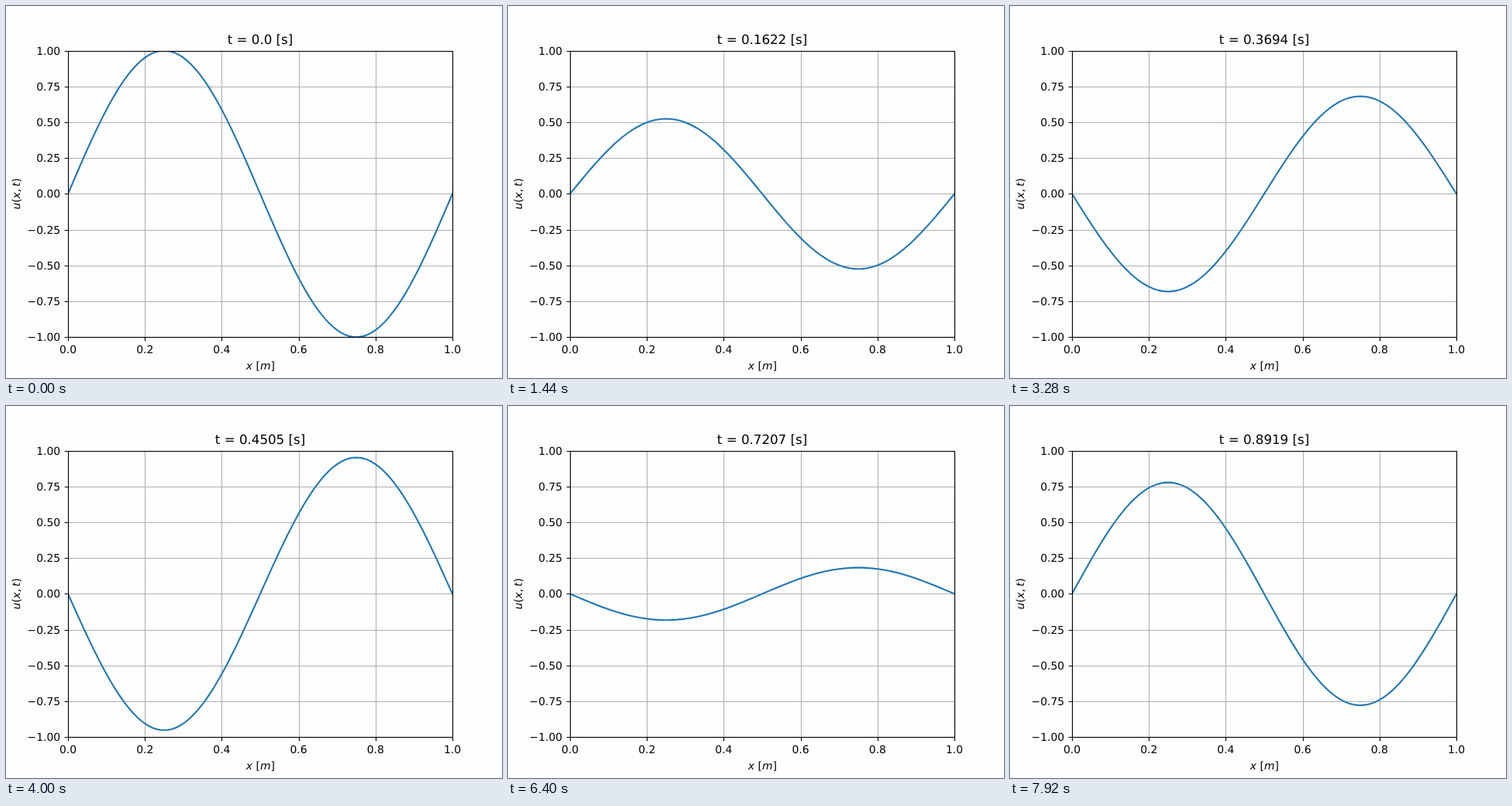
An HTML page that plays this animation: 640x480 px, repeating every 8000 ms.

```html
<!DOCTYPE html>
<html lang="en">
<head>
<meta charset="utf-8">
<title>Standing wave</title>
<style>
  html, body { margin: 0; width: 100%; height: 100%; overflow: hidden; background: #fefefe; }
  svg { display: block; width: 640px; height: 480px; }
  text { font: 13.889px "DejaVu Sans", sans-serif; text-rendering: geometricPrecision; text-anchor: middle; }
  .right { text-anchor: end; }
  .title { font-size: 16.667px; }
  .var { font-style: italic; }
  .grid { stroke: #b0b0b0; }
  .axis { stroke: #000; }
  .grid, .axis { fill: none; stroke-width: 1.11; }
  .wave { fill: none; stroke: #1f77b4; stroke-width: 2.083; stroke-linecap: square; stroke-linejoin: round; }
</style>
</head>
<body>
<svg viewBox="0 0 640 480">
  <clipPath id="box"><rect x="80" y="58" width="497" height="370"/></clipPath>
  <path id="grid" class="grid"/>
  <g clip-path="url(#box)"><path id="wave" class="wave"/></g>
  <path id="ticks" class="axis"/>
  <rect class="axis" x="80.5" y="58.5" width="496" height="369"/>
  <g id="labels"></g>
  <text id="title" class="title" x="328" y="49"></text>
  <text x="328.4" y="469"><tspan class="var">x</tspan><tspan dx="4.5">[</tspan><tspan class="var">m</tspan><tspan>]</tspan></text>
  <text transform="translate(17.5 242.4) rotate(-90)"><tspan class="var">u</tspan><tspan>(</tspan><tspan class="var">x</tspan><tspan>,</tspan><tspan class="var" dx="2.7">t</tspan><tspan>)</tspan></text>
</svg>
<script>
const LEFT = 80, WIDTH = 496, MID = 242.4, HALF = 184.8;
const STEP = 80, COUNT = 100, RATE = 111;
const $ = id => document.getElementById(id);
const px = x => LEFT + WIDTH * x;
const py = u => MID - HALF * u;
const snap = v => Math.floor(v + 0.5) + 0.5;

function label(str, x, y, cls) {
  const el = document.createElementNS("http://www.w3.org/2000/svg", "text");
  el.setAttribute("x", x);
  el.setAttribute("y", y);
  if (cls) el.setAttribute("class", cls);
  el.textContent = str;
  $("labels").append(el);
}

function drawAxes() {
  let grid = "", ticks = "";
  for (let i = 0; i <= 5; i++) {
    const x = snap(px(i / 5));
    grid += `M${x} 58V428`;
    ticks += `M${x} 427.5v4.86`;
    label((i / 5).toFixed(1), px(i / 5), 448);
  }
  for (let i = -4; i <= 4; i++) {
    const u = i / 4, y = snap(py(u));
    grid += `M80 ${y}H577`;
    ticks += `M80.5 ${y}h-4.86`;
    label((u < 0 ? "\u2212" : "") + Math.abs(u).toFixed(2), 70.1, Math.round(py(u) + 5), "right");
  }
  $("grid").setAttribute("d", grid);
  $("ticks").setAttribute("d", ticks);
}

function drawWave(n) {
  const t = n / RATE, amp = Math.cos(2 * Math.PI * t);
  const pts = [];
  for (let i = 0; i <= 100; i++) {
    const x = i / 100;
    pts.push(px(x).toFixed(2) + " " + py(amp * Math.sin(2 * Math.PI * x)).toFixed(2));
  }
  $("wave").setAttribute("d", "M" + pts.join("L"));
  $("title").textContent = `t = ${n ? +t.toFixed(4) : "0.0"} [s]`;
}

let last = -1, start = null;
function tick(now) {
  if (start === null) start = now;
  const n = Math.floor((now - start) / STEP) % COUNT;
  if (n !== last) drawWave(last = n);
  requestAnimationFrame(tick);
}

drawAxes();
drawWave(0);
requestAnimationFrame(tick);
</script>
</body>
</html>
```
